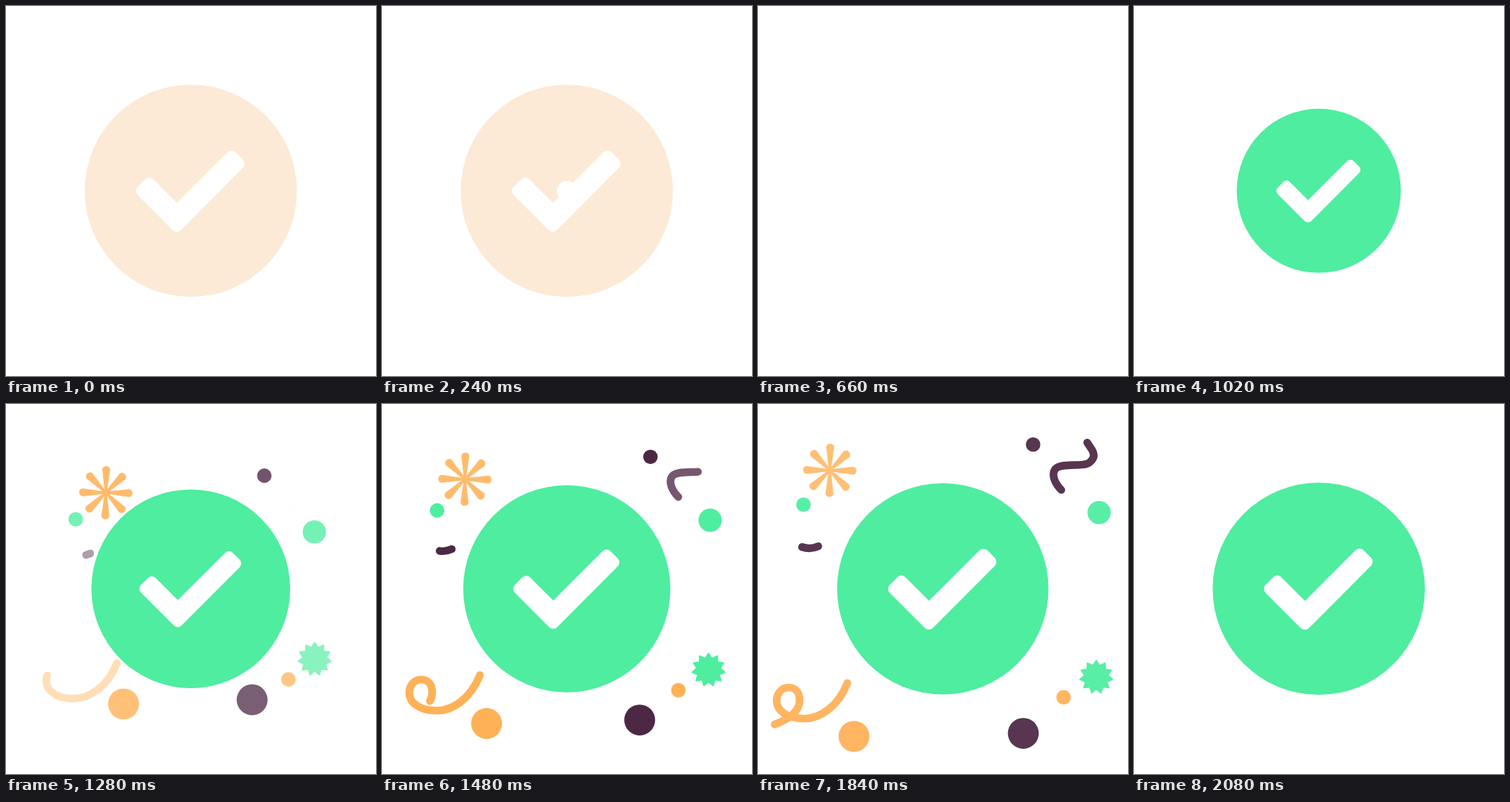
Animation, 500 px wide and 500 px high, one loop 5980 ms. Source, as an HTML page:

```html
<!DOCTYPE html>
<html lang="en">
<head>
<meta charset="utf-8">
<title>Success check</title>
<style>
  html, body { margin: 0; width: 100%; height: 100%; overflow: hidden; background: #fff; }
  svg { display: block; width: 100%; height: 100%; }
</style>
</head>
<body>
<svg id="stage" viewBox="0 0 500 500"></svg>
<script>
const LOOP = 5980;
const CX = 249.7, CY = 249.7, R = 143.4;
const GREEN = '#4eeda0', ORANGE = '#ffb157', PURPLE = '#4d2845', PEACH = '#fcead6';

const stage = document.getElementById('stage');
const clamp = (v, lo = 0, hi = 1) => Math.min(hi, Math.max(lo, v));

function add(parent, tag, attrs = {}) {
  const el = document.createElementNS('http://www.w3.org/2000/svg', tag);
  for (const key in attrs) el.setAttribute(key, attrs[key]);
  parent.appendChild(el);
  return el;
}

// Ease with flat ends; x1 and x2 are the horizontal handles.
function ease(x, x1, x2) {
  let lo = 0, hi = 1;
  for (let i = 0; i < 24; i++) {
    const s = (lo + hi) / 2, q = 1 - s;
    if (3 * q * q * s * x1 + 3 * q * s * s * x2 + s * s * s < x) lo = s; else hi = s;
  }
  return lo * lo * (3 - 2 * lo);
}

// Confetti: each piece is drawn at its resting place and shifted back along its path.
const confetti = add(stage, 'g');
const pieces = [];

function piece(dx, dy, alpha, max = 1) {
  const el = add(confetti, 'g');
  pieces.push({ el, dx, dy, alpha, max });
  return el;
}

function dot(x, y, r, fill, dx, dy, alpha) {
  add(piece(dx, dy, alpha), 'circle', { cx: x, cy: y, r, fill });
}

function ribbon(d, stroke, dx, dy, alpha, from, to) {
  const path = add(piece(dx, dy, alpha), 'path', {
    d, stroke, fill: 'none', 'stroke-width': 10.4,
    'stroke-linecap': 'round', 'stroke-linejoin': 'round', pathLength: 100
  });
  Object.assign(pieces[pieces.length - 1], { path, from, to });
}

function flower(x, y) {
  const g = add(piece(-35, -28, 0.87, 0.87), 'g', { fill: ORANGE });
  for (let i = 0; i < 8; i++) {
    const spoke = add(g, 'g', { transform: `translate(${x} ${y}) rotate(${i * 45 + 1})` });
    add(spoke, 'path', { d: 'M-1.4 0L-5.4 -31.5A5.5 5.5 0 0 1 5.4 -31.5L1.4 0Z' });
  }
}

function burst(x, y) {
  const pts = [];
  for (let i = 0; i < 22; i++) {
    const a = i * Math.PI / 11, r = i % 2 ? 15.6 : 21.8;
    pts.push([x + r * Math.sin(a), y - r * Math.cos(a)]);
  }
  add(piece(37, 22.5, 0.66), 'polygon', {
    points: pts.join(' '), fill: GREEN, stroke: GREEN,
    'stroke-width': 2.4, 'stroke-linejoin': 'round'
  });
}

flower(100, 92);
burst(454, 367);
dot(370, 58, 9.8, PURPLE, 21, -39, 0.79);
dot(457.5, 148.7, 15.7, GREEN, 41, -24.3, 0.78);
dot(64, 137.5, 9.8, GREEN, -30.3, -18.3, 0.78);
dot(132, 445.7, 20.9, ORANGE, -27, 40.5, 0.8);
dot(410.5, 394.5, 9.8, ORANGE, 29, 22.5, 0.73);
dot(356.5, 441.5, 20.9, PURPLE, 24, 42, 0.74);
ribbon('M123 375C110 408 85 423 65 423C41 423 27.5 412 27.5 399C27.5 388 35 381 44 381' +
  'C53 381 58.5 388 58.5 398C58.5 412 48 421 32 428L22 432', ORANGE, -27, 25, 0.42, 58, 95.5);
ribbon('M84 193Q73 198 62 194', PURPLE, -30, -9, 0.45, 26, 100);
ribbon('M408 118C399 109 395 98 399 91C405 80 436 88 446 81C454 75 453 68 447 60L443 54',
  PURPLE, 22, -22, 0, 0, 93);

// Badge with the check mark, and the white disc that wipes it away.
const badge = add(stage, 'g');
const disc = add(badge, 'circle', { cx: CX, cy: CY, r: R });
add(badge, 'path', {
  d: 'M183.6 249.8L193.5 239.8L231 277.3L304.8 203.5L314.5 213.2L230.8 297Z',
  fill: '#fff', stroke: '#fff', 'stroke-width': 16, 'stroke-linejoin': 'round'
});
const hole = add(stage, 'circle', { cx: CX, cy: CY, r: 0, fill: '#fff' });

function drawBadge(t) {
  const wiping = t < 640, shown = wiping || t >= 910;
  badge.setAttribute('visibility', shown ? 'visible' : 'hidden');
  hole.setAttribute('r', wiping ? R * ease(clamp((t - 20) / 620), 0.8, 0.6) : 0);
  disc.setAttribute('fill', wiping ? PEACH : GREEN);
  let scale = 1;
  if (!wiping && t < 2080) {
    const age = Math.max(0, t - 900);
    scale = 1 - 0.41 * Math.exp(-0.0049 * age) - 0.59 * clamp(1 - age / 110) ** 2;
  }
  badge.setAttribute('transform',
    `translate(${CX} ${CY}) scale(${scale}) translate(${-CX} ${-CY})`);
}

// What is left of the flight, easing out to zero.
const left = t => (1 - clamp((t - 800) / 1260)) ** 3;

function drawConfetti(t) {
  const shown = t > 1040 && t < 2075;
  confetti.setAttribute('visibility', shown ? 'visible' : 'hidden');
  if (!shown) return;
  const move = (left(1280) - left(t)) / (left(1280) - left(1700));
  const out = clamp((2075 - t) / 250);
  for (const p of pieces) {
    const k = move - 1;
    p.el.setAttribute('transform', `translate(${k * p.dx} ${k * p.dy})`);
    p.el.setAttribute('opacity', clamp(p.alpha + (t - 1280) / 260, 0, p.max) * out);
    if (p.path) {
      const len = clamp(p.from + (p.to - p.from) * move, 0, 100);
      p.path.setAttribute('stroke-dasharray', `${len} 300`);
    }
  }
}

function draw(t) {
  drawBadge(t);
  drawConfetti(t);
}

const start = performance.now();
function tick() {
  draw((performance.now() - start) % LOOP);
  requestAnimationFrame(tick);
}
draw(0);
requestAnimationFrame(tick);
</script>
</body>
</html>
```
